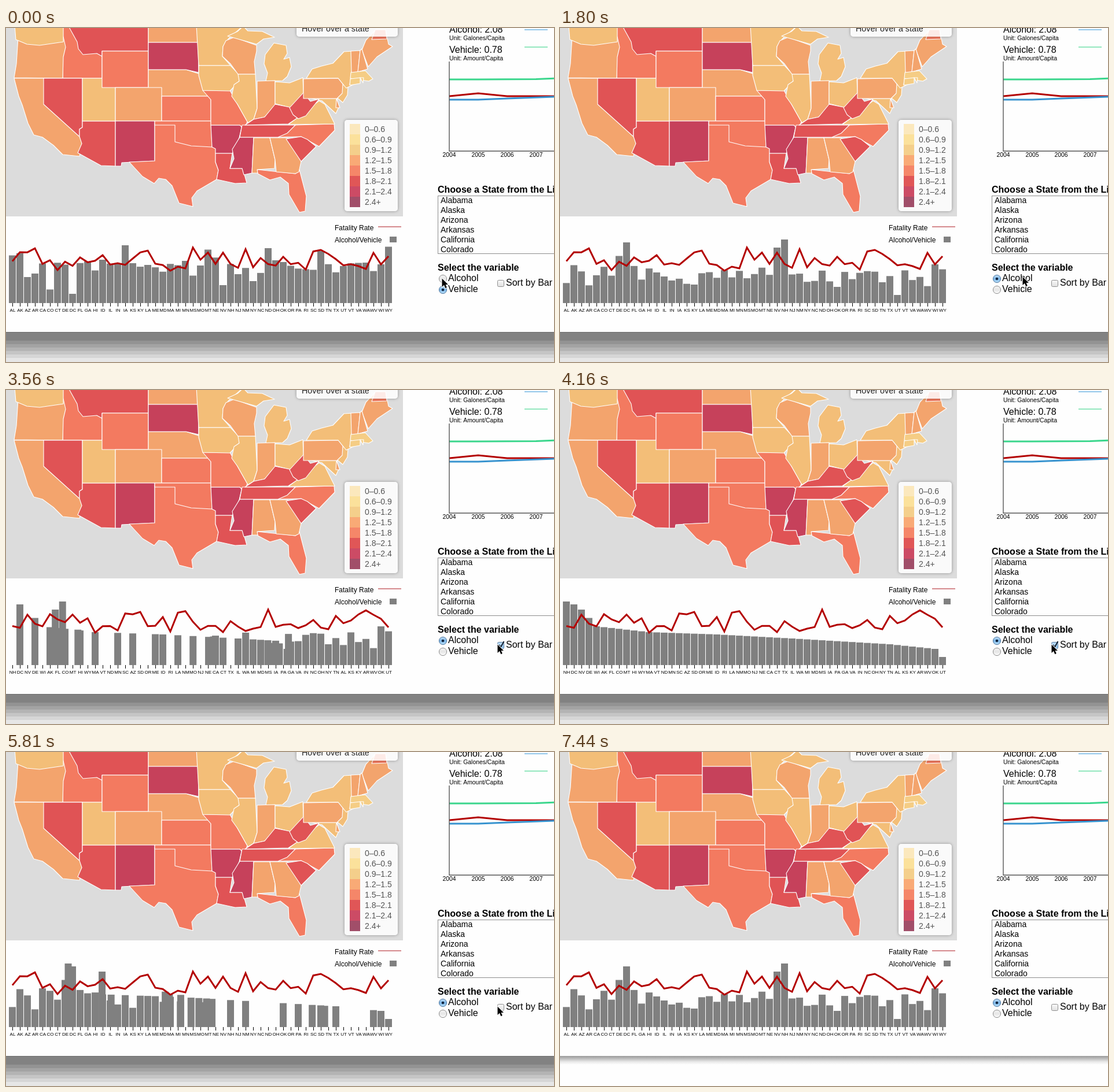
These frames come from a looping animation (947x578 px, 7.54 s). An HTML page with a canvas:

```html
<!DOCTYPE html>
<html lang="en">
<head>
<meta charset="utf-8">
<title>Fatality rates by state</title>
<style>
html, body { margin: 0; width: 100%; height: 100%; overflow: hidden; background: #fefefe; }
canvas { display: block; }
</style>
</head>
<body>
<canvas id="stage" width="947" height="578"></canvas>
<script>
const W = 947, H = 578, LOOP = 7540;
const stage = document.getElementById('stage').getContext('2d');
const baseCanvas = document.createElement('canvas');
baseCanvas.width = W;
baseCanvas.height = H;
const base = baseCanvas.getContext('2d');

const mix = (a, b, p) => a + (b - a) * p;
const clamp = v => Math.max(0, Math.min(1, v));
const cubicInOut = u => u < .5 ? 4 * u ** 3 : 1 - 4 * (1 - u) ** 3;
const stepsSince = (t, start) => Math.floor((t - start + 12) / 148);

// Piecewise linear curve through a few points
function curve(points, x) {
  const i = Math.max(1, points.findIndex(p => p[0] >= x));
  const [[x0, y0], [x1, y1]] = points.slice(i - 1, i + 1);
  return mix(y0, y1, (x - x0) / (x1 - x0));
}

const codes = ('AL AK AZ AR CA CO CT DE DC FL GA HI ID IL IN IA KS KY LA ME MD MA MI MN MS MO MT ' +
  'NE NV NH NJ NM NY NC ND OH OK OR PA RI SC SD TN TX UT VT VA WA WV WI WY').split(' ');

// States from the highest value to the lowest
const byAlcohol = ('NH DC NV DE WI AK FL CO MT HI WY MA VT ND MN SC AZ SD OR ME ID RI LA NM MO NJ NE ' +
  'CA CT TX IL WA MI MD MS IA PA GA VA IN NC OH NY TN AL KS KY AR WV OK UT').split(' ');
const byVehicle = ('IA WY ND MT SD AK AL NE ID OH MN GA OK WA CT VA FL KS VT CA IL IN MA NH TN WI DE ' +
  'LA MI MO OR UT KY ME NM PA RI SC HI WV MD TX NC AR NJ MS AZ NY NV CO DC').split(' ');
const byFatality = ('MS AR NM SD LA SC AK AZ KY MT NV WV TN ID WY OK FL NC KS TX MO CO HI AL DE GA PA ' +
  'IN ME CA NE NH ND OR VT WI IL IA MD UT OH DC VA MI NY NJ MN WA RI CT MA').split(' ');

// Height on the stage falls off with rank
const heights = (ranking, points) => codes.map(c => curve(points, ranking.indexOf(c)));
const alcohol = heights(byAlcohol,
  [[0, 366], [1, 371], [2, 380], [4, 409], [11, 419], [20, 423], [30, 430], [43, 440], [49, 448], [50, 462]]);
const vehicle = heights(byVehicle,
  [[0, 376], [4, 386], [8, 401], [13, 406], [25, 409], [31, 412], [44, 426], [46, 431], [48, 445], [50, 460]]);
const fatality = heights(byFatality,
  [[0, 380], [3, 384], [6, 388], [11, 389], [14, 395], [20, 401], [28, 408], [35, 409], [42, 412], [50, 420]]);
const slot = codes.map(c => byAlcohol.indexOf(c));
const sortedCodes = byAlcohol.map(c => codes.indexOf(c));

function rect(c, x, y, w, h, fill) {
  c.fillStyle = fill;
  c.fillRect(x, y, w, h);
}

function text(c, str, x, y, size, color = '#000', weight = 'normal', align = 'left') {
  c.font = `${weight} ${size}px "Liberation Sans", Arial, sans-serif`;
  c.textAlign = align;
  c.fillStyle = color;
  c.fillText(str, x, y);
}

function polyline(c, pts, color, width) {
  c.beginPath();
  pts.forEach(([x, y]) => c.lineTo(x, y));
  c.strokeStyle = color;
  c.lineWidth = width;
  c.lineJoin = 'miter';
  c.stroke();
}

function region(fill, points) {
  const p = new Path2D(`M${points}Z`);
  base.fillStyle = fill;
  base.fill(p);
  base.strokeStyle = '#fff';
  base.lineWidth = 1.1;
  base.lineJoin = 'round';
  base.stroke(p);
}

const tints = ['#c6415b', '#e05355', '#f37a60', '#f3a46d', '#f3be78', '#f5cd85'];
const classEnds = [4, 13, 21, 36, 48, 51];

function state(code, points) {
  const rank = byFatality.indexOf(code);
  region(tints[classEnds.findIndex(end => rank < end)], points);
}

const box = (code, x, y, w, h) => state(code, `${x} ${y}h${w}v${h}h${-w}`);

// Later states cover the rough edges of earlier ones
function drawStates() {
  box('ID', 98, -5, 68, 92);
  state('OR', '21 15 18 62 14 86 98 87 99 50 103 33 99 15');
  state('WA', '15 -5 17 20 36 28 58 30 99 24 99 -5');
  state('MT', '107 -5 123 24 125 36 133 46 157 44 166 49 166 40 246 40 246 -5');
  state('CA', '14 87 22 118 28 133 38 165 48 185 63 189 82 203 98 219 127 222 132 195 132 87');
  state('NV', '65 87 132 87 132 172 127 175 127 188 65 132');
  state('AZ', '132 161 189 161 189 239 164 238 124 216 131 200 127 188 127 175 132 172');
  box('UT', 132, 87, 57, 74);
  box('WY', 166, 40, 80, 63);
  box('ND', 246, -5, 86, 30);
  state('NE', '246 72 311 72 333 79 349 118 246 118 246 103');
  state('SD', '246 25 332 25 333 77 311 72 246 72');
  box('CO', 189, 103, 80, 58);
  state('KS', '269 118 349 118 354 124 354 161 269 161');
  state('NM', '189 161 257 161 257 230 200 233 199 239 189 239');
  state('TX', '257 165 363 165 362 232 367 246 364 262 330 282 321 294 323 309 299 303 287 273 276 262 264 260 256 269 236 257 213 232 257 230');
  state('OK', '257 161 354 161 356 206 320 204 292 197 292 168 257 168');
  state('AR', '354 168 408 168 403 190 391 217 362 217 362 209 356 206');
  state('MO', '340 108 387 108 400 132 417 162 412 176 404 168 354 168 354 124');
  state('MN', '329 -5 333 65 388 65 374 49 375 32 384 19 411 -5');
  state('IA', '333 65 388 65 402 80 403 92 387 109 340 108 333 82');

  state('WI', '375 32 380 22 394 16 433 30 433 40 429 58 431 80 401 80 388 62 374 49');
  state('MI', '383 14 400 6 410 -3 418 5 443 6 464 16 445 19 433 28');
  state('MI', '449 92 452 78 446 62 448 46 463 26 484 30 486 44 480 54 490 51 493 67 486 84 478 91');
  state('IL', '401 80 431 80 434 139 428 158 418 164 400 132 390 118 394 98 403 92');
  state('IN', '434 92 465 91 465 133 447 154 428 158 434 139');
  state('OH', '465 93 490 95 513 86 514 112 493 138 465 131');

  state('LA', '362 217 391 217 387 243 409 243 416 268 396 269 364 262 367 246 362 232');
  state('MS', '404 189 428 189 425 251 411 254 408 243 387 243 394 226 391 210');
  state('NC', '470 189 500 168 567 166 568 177 541 205 510 188');
  state('FL', '434 245 500 252 507 245 519 291 517 317 507 319 489 288 488 269 474 258 456 263 435 252');
  state('AL', '428 190 456 190 465 228 464 243 434 245 435 251 425 251');
  state('GA', '456 190 486 190 510 231 506 249 500 252 467 249 465 228');
  state('SC', '484 192 510 188 521 193 536 205 510 231');
  state('TN', '408 168 500 168 486 182 470 189 404 189');
  state('VA', '488 167 541 126 551 132 568 166');
  state('KY', '413 168 428 158 447 154 465 132 490 137 503 156 488 166');
  state('MD', '529 122 572 122 575 137 570 148 546 126');
  state('WV', '490 138 514 112 526 127 541 123 518 152 505 157 496 150');
  state('DE', '571 122 577 138 570 138');

  state('NJ', '580 97 591 102 590 116 582 129 570 119');
  state('NY', '519 87 529 71 545 66 565 61 584 41 600 40 598 70 594 98 606 95 588 104 574 87');
  state('PA', '514 88 574 87 582 97 581 113 572 122 514 122');
  state('VT', '596 40 612 39 608 77 597 77');
  state('ME', '615 38 622 21 640 2 656 3 661 28 668 32 641 50 626 67');
  state('NH', '612 39 615 36 625 71 608 76');
  state('MA', '596 77 621 74 634 88 627 92 595 87');
  state('CT', '595 88 612 86 612 96 594 99');
  state('RI', '612 86 618 86 617 95');
  region(tints[2], '632 20 638 3 656 3 658 19');
}

function panel(x, y, w, h) {
  base.save();
  base.beginPath();
  base.rect(0, 0, W, H);
  base.roundRect(x, y, w, h, 5);
  base.clip('evenodd');
  base.shadowColor = 'rgba(0,0,0,.35)';
  base.shadowBlur = 5;
  base.beginPath();
  base.roundRect(x, y, w, h, 5);
  base.fillStyle = '#fff';
  base.fill();
  base.restore();
  base.beginPath();
  base.roundRect(x, y, w, h, 5);
  base.fillStyle = 'rgba(255,255,255,.85)';
  base.fill();
}

function drawMap() {
  rect(base, 0, 0, 686, 326, '#dcdcdc');
  drawStates();
  panel(502, -30, 175, 45);
  text(base, 'Hover over a state', 511, 6, 14.3, '#222');
  panel(585, 159, 92, 158);
  const scale = ['#fbe8bd', '#fbe19b', '#f4cf8b', '#f9aa76', '#f58669', '#e05657', '#cc4b65', '#a14e69'];
  scale.forEach((color, i) => {
    const low = (.3 * i + .3).toFixed(1), high = (.3 * i + .6).toFixed(1);
    const label = i === 0 ? '0–0.6' : i === 7 ? '2.4+' : `${low}–${high}`;
    rect(base, 594, 166 + 18 * i, 18, 18, color);
    text(base, label, 620, 180 + 18 * i, 14, '#555');
  });
}

function drawSidebar() {
  text(base, 'Alcohol: 2.08', 766, 8, 16);
  text(base, 'Unit: Galones/Capita', 766, 21, 10.4);
  text(base, 'Vehicle: 0.78', 766, 43, 16);
  text(base, 'Unit: Amount/Capita', 766, 56, 10.4);
  rect(base, 896, 2, 40, 2, '#92c6ea');
  rect(base, 896, 32, 40, 2, '#93e7be');
  polyline(base, [[766, 89], [816, 89], [916, 88.5], [950, 87]], '#3ad68c', 3);
  polyline(base, [[766, 118], [816, 113], [866, 118], [950, 118]], '#b30000', 3);
  polyline(base, [[766, 124], [816, 124], [866, 122], [950, 119]], '#3793cf', 3);
  polyline(base, [[766, 58], [766, 213], [950, 213]], '#555', 1.4);
  for (let i = 0; i < 4; i++) text(base, 2004 + i, 766 + 50 * i, 223, 10.4, '#000', 'normal', 'center');

  text(base, 'Choose a State from the List', 746, 285, 16, '#000', 'bold');
  base.strokeStyle = '#8c8c8c';
  base.lineWidth = 1;
  base.strokeRect(746.5, 290.5, 300, 100);
  ['Alabama', 'Alaska', 'Arizona', 'Arkansas', 'California', 'Colorado'].forEach((s, i) =>
    text(base, s, 751, 303 + 17 * i, 14));
  text(base, 'Select the variable', 746, 420, 16, '#000', 'bold');
  text(base, 'Alcohol', 764, 438, 16);
  text(base, 'Vehicle', 764, 457, 16);
  text(base, 'Sort by Bar', 864, 446, 16);
}

function drawKey() {
  text(base, 'Fatality Rate', 568, 350, 12);
  rect(base, 643, 343, 40, 2, '#d58a8d');
  text(base, 'Alcohol/Vehicle', 568, 371, 12);
  rect(base, 663, 361, 12, 10, '#808080');
}

// How far the sort has run, counted in lengths of one bar's move
function sortPhase(t) {
  if (t < 2818) return { sorted: false, phase: 9 };
  if (t < 5198) return { sorted: true, phase: .117 + .43 * stepsSince(t, 2830) };
  return { sorted: false, phase: .333 + .43 * stepsSince(t, 5210) };
}

function drawChart(t) {
  const { sorted, phase } = sortPhase(t);
  const fill = t < 750 ? 0 : t < 900 ? .5 : 1;
  const offset = (i, u) => {
    const p = cubicInOut(clamp(u));
    return 13 * mix(i, slot[i], sorted ? p : 1 - p);
  };
  codes.forEach((code, i) => {
    const top = mix(vehicle[i], alcohol[i], fill);
    rect(stage, 5 + offset(i, phase - .057 * i), top, 12, 476 - top, '#808080');
  });
  codes.forEach((code, i) => {
    const x = 11 + offset(i, phase);
    rect(stage, Math.round(x), 476, 1, 6, '#000');
    text(stage, code, x + .5, 491, 8, '#000', 'normal', 'center');
  });
  const line = codes.map((c, i) => [11 + 13 * i, fatality[sorted ? sortedCodes[i] : i]]);
  polyline(stage, line, '#b30000', 3);
}

function shade(y0, y1, ...colors) {
  const g = stage.createLinearGradient(0, y0, 0, y1);
  colors.forEach((color, i) => g.addColorStop(i / (colors.length - 1), color));
  return g;
}

function radio(y, on) {
  stage.beginPath();
  stage.arc(755, y, 6.6, 0, 7);
  stage.fillStyle = on ? shade(y - 7, y + 7, '#c9e2f7', '#79b4e6', '#bfe4fb')
    : shade(y - 7, y + 7, '#f4f4f4', '#e6e6e6', '#fff');
  stage.fill();
  stage.strokeStyle = on ? '#52789f' : '#8e8e8e';
  stage.lineWidth = 1;
  stage.stroke();
  if (!on) return;
  stage.beginPath();
  stage.arc(755, y, 2.3, 0, 7);
  stage.fillStyle = '#10233c';
  stage.fill();
}

function checkbox(on, pressed) {
  stage.beginPath();
  stage.roundRect(849.5, 436.5, 11, 11, 2);
  stage.fillStyle = pressed ? shade(436, 447, '#bcbcbc', '#d2d2d2')
    : on ? shade(436, 447, '#c2dff7', '#8fc3ee') : shade(436, 447, '#fafafa', '#e2e2e2');
  stage.fill();
  stage.strokeStyle = on ? '#5c7fa3' : '#8e8e8e';
  stage.lineWidth = 1;
  stage.stroke();
  if (on) polyline(stage, [[852, 441], [855, 445], [860.5, 435]], '#111b2a', 2);
}

function pointerAt(t) {
  if (t < 150) return [753, 433];
  if (t < 1788) return [751, 436];
  if (t < 6678) {
    const p = 1 - (1 - clamp(stepsSince(t, 1800) / 6)) ** 2;
    return [mix(799, 849, p), mix(430, 440, p)];
  }
  const p = clamp((stepsSince(t, 6690) + 1) / 4);
  return [mix(849, 918, p), mix(440, 553, p)];
}

function drawPointer([x, y]) {
  stage.save();
  stage.translate(x, y);
  const arrow = new Path2D('M.5 .5V15L4 11.8 6.3 17.2 8.8 16.1 6.6 10.9H11Z');
  stage.lineJoin = 'round';
  stage.strokeStyle = '#fff';
  stage.lineWidth = 1.8;
  stage.stroke(arrow);
  stage.fillStyle = '#000';
  stage.fill(arrow);
  stage.restore();
}

function drawFooter(t) {
  if (t >= 7440) {
    rect(stage, 0, 526, W, 15, shade(526, 541, '#9a9a9a', '#c0c0c0', '#e8e8e8', '#fefefe'));
    return;
  }
  rect(stage, 0, 526, W, 1, '#6c6c6c');
  for (let i = 0; i < 7; i++) {
    const y = i ? 535 + 6 * i : 527, gray = 130 + 16.7 * i;
    rect(stage, 0, y, W, H - y, `rgb(${gray},${gray},${gray})`);
  }
}

function draw(t) {
  stage.drawImage(baseCanvas, 0, 0);
  drawChart(t);
  radio(434, t >= 750);
  radio(453, t < 750);
  checkbox(t >= 2818 && t < 5198, t >= 4910 && t < 5198);
  drawFooter(t);
  if (t < 7440) drawPointer(pointerAt(t));
}

rect(base, 0, 0, W, H, '#fefefe');
drawMap();
drawSidebar();
drawKey();

const start = performance.now();
function frame() {
  draw((performance.now() - start) % LOOP);
  requestAnimationFrame(frame);
}
frame();
</script>
</body>
</html>
```
